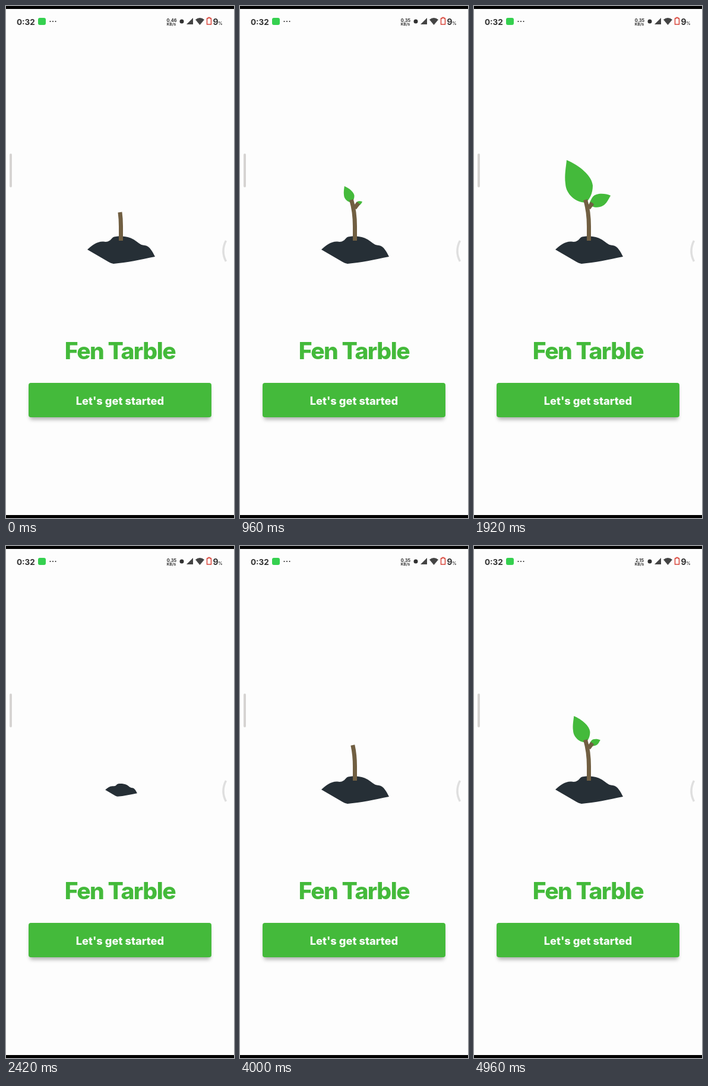
These frames come from a looping animation (384 by 864 pixels, 5000 ms). An HTML page:

```html
<!DOCTYPE html>
<html lang="en">
<head>
<meta charset="utf-8">
<title>Seedling welcome screen</title>
<style>
  html, body { margin: 0; width: 100%; height: 100%; overflow: hidden; background: #000; }
  svg { display: block; width: 100%; height: 100%; }
  text { font-family: Inter, "Open Sans", sans-serif; font-weight: 700; }
  .status { fill: #303030; }
  .leaf { fill: #44ba3b; }
  .wood { fill: none; stroke: #715f42; stroke-width: 7; }
</style>
</head>
<body>
<svg viewBox="0 0 384 864">
  <defs>
    <filter id="blur" x="-10%" y="-30%" width="120%" height="160%">
      <feGaussianBlur stdDeviation="3"/>
    </filter>
  </defs>
  <rect width="384" height="864"/>
  <rect y="5" width="384" height="854" fill="#fdfdfd"/>

  <!-- Status bar -->
  <g class="status">
    <text x="18" y="32" font-size="13.5">0:32</text>
    <rect x="54" y="20" width="13" height="12" rx="3" fill="#35d04f"/>
    <circle cx="74.5" cy="26" r="1.1"/>
    <circle cx="79" cy="26" r="1.1"/>
    <circle cx="83.5" cy="26" r="1.1"/>
    <g font-size="7.4" text-anchor="middle">
      <text id="speed" x="279" y="27.3"></text>
      <text x="278.5" y="33.3" font-size="6.6">KB/s</text>
    </g>
    <circle cx="296" cy="26" r="3.5"/>
    <path d="M315 20V31H304Z" fill="#444"/>
    <path d="M319 23Q326.5 17 334 23L326.5 32Z" fill="#444"/>
    <path d="M340.5 19.5H343.5V21H345.5V31H338.500V21H340.5Z" fill="none" stroke="#d9453a" stroke-width="1.5"/>
    <text x="348.5" y="32" font-size="14">9</text>
    <text x="357.5" y="31.5" font-size="7">%</text>
  </g>

  <!-- Edge handles -->
  <rect x="6" y="249" width="4" height="57" rx="2" fill="#d6d4d2"/>
  <path d="M370.5 396Q361.5 413.5 370.5 431" fill="none" stroke="#dfdfdf" stroke-width="3.5"/>

  <!-- Seedling -->
  <path id="mound" fill="#262f36" d="M137 411C145 404 153 397 164 397.5C172 399 175 396 179 391.5C183 387 203 388 212 392.500C222 397 224 403.500 234 404C242 405 247 415 251 423C226 428 204 433 181 435Q176 434 173 432Z"/>
  <path id="bigLeaf" class="leaf" d="M156 260C178 269 199 287 200 303C200 316 195 326 189 331C176 334 155 320 154 300C152 285 155 272 156 260Z"/>
  <path id="smallLeaf" class="leaf" d="M230 320C221 316 206 315 200 322C197 326 195 331 194 334C199 341 210 341 217 337C224 333 226 326 230 320Z"/>
  <path id="branch" class="wood" pathLength="1" d="M193 341L199.5 332.5"/>
  <path id="stem" class="wood" pathLength="69" d="M193.5 396V372Q193.5 347 187.5 327"/>

  <!-- Title and button -->
  <text x="192" y="596" text-anchor="middle" font-size="39" style="font-weight:800;letter-spacing:-1.5px" fill="#44ba3b">Fen Tarble</text>
  <rect x="40" y="641" width="304" height="57" rx="4" fill="#808080" opacity=".6" filter="url(#blur)"/>
  <rect x="38" y="636" width="308" height="58" rx="4" fill="#44ba3b"/>
  <text x="192" y="673" text-anchor="middle" font-size="18.3" style="font-weight:800" fill="#fdfdfd">Let's get started</text>
</svg>
<script>
  // The plant's own cycle is shorter than the loop and restarts partway through it.
  const LOOP = 5000, RESTART = 2190, PERIOD = 3772;
  const [speed, mound, bigLeaf, smallLeaf, branch, stem] =
    ["speed", "mound", "bigLeaf", "smallLeaf", "branch", "stem"].map(id => document.getElementById(id));

  function ease(time, start, end) {
    const p = Math.min(1, Math.max(0, (time - start) / (end - start)));
    return p * p * (3 - 2 * p);
  }

  function scaleAbout(node, x, y, scale) {
    node.setAttribute("transform", `translate(${x} ${y}) scale(${scale}) translate(${-x} ${-y})`);
    node.style.visibility = scale > 0.01 ? "visible" : "hidden";
  }

  function grow(path, length) {
    path.setAttribute("stroke-dasharray", `${length} 200`);
    path.style.visibility = length > 0 ? "visible" : "hidden";
  }

  function draw(now) {
    const t = now % LOOP;
    const age = t < RESTART ? t : t - PERIOD;
    scaleAbout(mound, 194, 412, ease(age, RESTART - PERIOD, 2670 - PERIOD));
    grow(stem, 69 * ease(age, -1050, 618));
    grow(branch, ease(age, 450, 900));
    scaleAbout(bigLeaf, 188, 331, ease(age, 360, 1790));
    scaleAbout(smallLeaf, 195, 335, 1.03 * ease(age, 305, 2090));
    speed.textContent = t < 200 ? "0.46" : t < 4200 ? "0.35" : "2.15";
  }

  const begin = performance.now();
  function tick() {
    draw(performance.now() - begin);
    requestAnimationFrame(tick);
  }
  tick();
</script>
</body>
</html>
```
